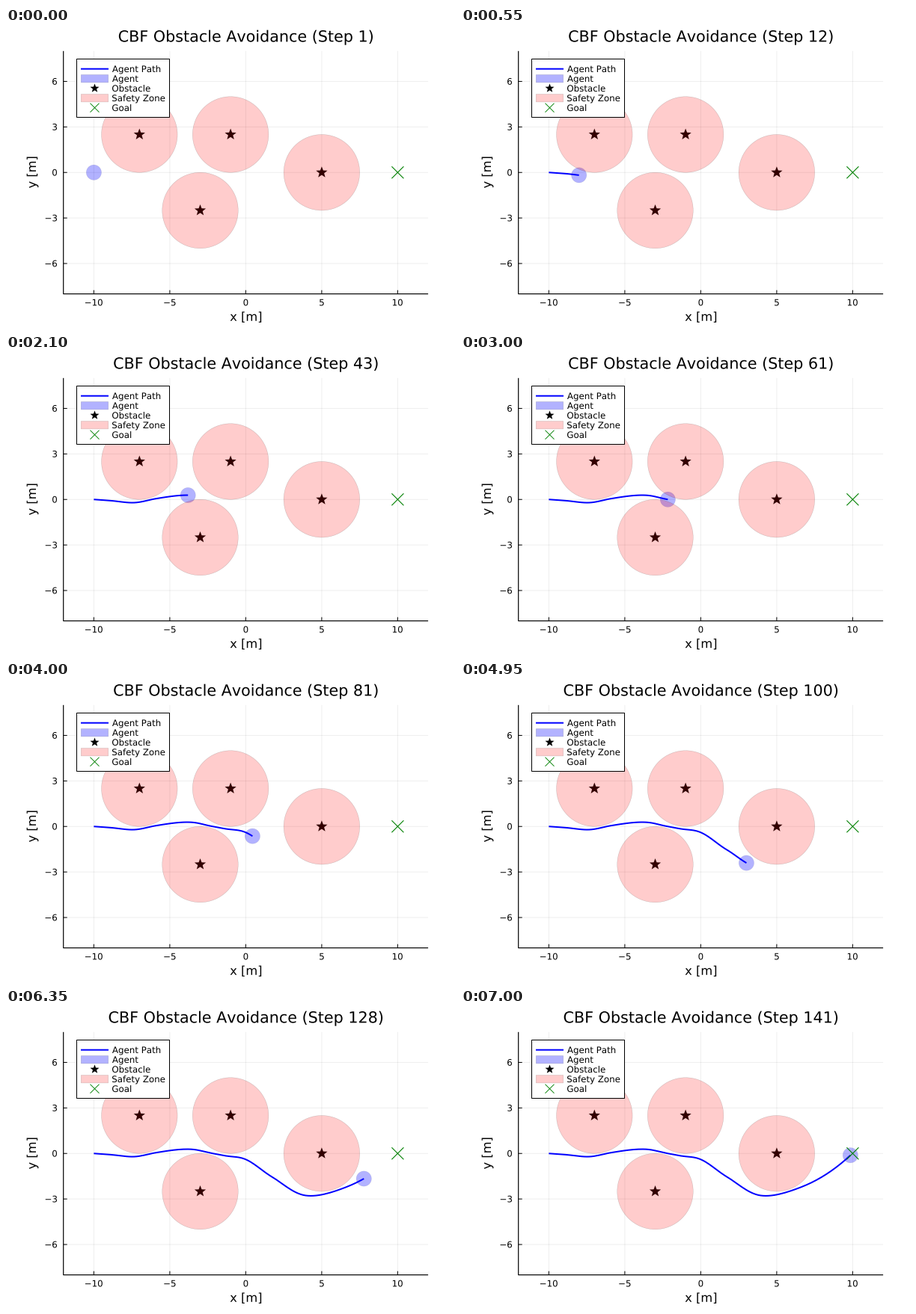
Animation, 600 px wide and 400 px high, one loop 7050 ms. Source, as a matplotlib script:

```python
import numpy as np
import matplotlib.pyplot as plt
from matplotlib.animation import FuncAnimation
from matplotlib.patches import Circle, PathPatch, Polygon, Rectangle
from matplotlib.path import Path
from matplotlib.textpath import TextPath

W, H, DPI = 600, 400, 100
PT = 72 / DPI  # points per pixel
STEPS, INTERVAL = 141, 50
LEFT, TOP, RIGHT, BOTTOM = 76.7, 30.8, 564.1, 355.7
CX, CY, UNIT = (LEFT + RIGHT) / 2, (TOP + BOTTOM) / 2, 20.3
SMALL, LABEL, TITLE = 11.83, 16.27, 20.7  # text sizes in pixels
BLUE, RED, GREEN = (0, 0, 1), (1, 0, 0), (0, 0.5, 0)
EDGE = (0, 0, 0, 0.2)

# step, x, y of the turning points on the agent's route
WAYPOINTS = [(0, -10, 0), (6, -8.9, -0.08), (15, -7.34, -0.21),
             (24, -5.93, 0.05), (43, -3.7, 0.28), (60, -2.17, 0),
             (67, -1.3, -0.16), (75, -0.2, -0.32), (90, 1.72, -1.54),
             (105, 3.94, -2.77), (120, 6.6, -2.22), (140, 9.85, -0.12)]
OBSTACLES = [(-7, 2.5), (-3, -2.5), (-1, 2.5), (5, 0)]

plt.rcParams["font.family"] = "DejaVu Sans"
plt.rcParams["text.kerning_factor"] = 6  # practically no kerning


def px(x):
    return CX + UNIT * x


def py(y):
    return CY - UNIT * y


def route(t):
    """Cubic Hermite curve through the waypoints."""
    data = np.array(WAYPOINTS, float)
    k, p = data[:, 0], data[:, 1:]
    m = np.gradient(p, k, axis=0, edge_order=2)
    i = np.clip(np.searchsorted(k, t, side="right") - 1, 0, len(k) - 2)
    h = (k[i + 1] - k[i])[:, None]
    s = (t - k[i])[:, None] / h
    return ((1 + 2 * s) * (1 - s) ** 2 * p[i] + s * (1 - s) ** 2 * h * m[i]
            + s * s * (3 - 2 * s) * p[i + 1] + s * s * (s - 1) * h * m[i + 1])


def text_path(x, y, text, size=SMALL, align=0.5, upright=False):
    """Text outline; align 0, 0.5, 1 sets left, centre, right."""
    glyphs = TextPath((0, 0), text, size=size)
    box = glyphs.get_extents()
    u, v = glyphs.vertices.T
    u = u - box.x0 - align * box.width
    verts = (x - v, y - u) if upright else (x + u, y - v)
    return Path(np.column_stack(verts), glyphs.codes)


fig = plt.figure(figsize=(W / DPI, H / DPI), dpi=DPI, facecolor="white")
ax = fig.add_axes([0, 0, 1, 1])
ax.set(xlim=(0, W), ylim=(H, 0))
ax.axis("off")


def label(*args, **kw):
    return ax.add_patch(PathPatch(text_path(*args, **kw), fc="black",
                                  lw=0, zorder=10))


def stroke(x, y, color="black", width=1.0, z=1, **kw):
    return ax.plot(x, y, color=color, lw=width * PT, zorder=z, snap=False,
                   solid_capstyle="butt", **kw)[0]


def shape(patch, face, alpha=1, edge=EDGE, width=0.5, z=1):
    patch.set(facecolor=(*face, alpha), edgecolor=edge, linewidth=width * PT,
              zorder=z, snap=False)
    return ax.add_patch(patch)


def star(x, y, r, z):
    a = np.arange(10) * np.pi / 5
    rad = np.where(np.arange(10) % 2, 0.42 * r, r)
    pts = np.column_stack([x + rad * np.sin(a), y - rad * np.cos(a)])
    shape(Polygon(pts), (0, 0, 0), width=0, z=z)


def cross(x, y, r, width, z):
    for d in (-r, r):
        stroke([x - r, x + r], [y - d, y + d], GREEN, width, z)


# axes, grid, ticks and their labels
for v in range(-10, 11, 5):
    stroke([px(v)] * 2, [TOP, BOTTOM], (0, 0, 0, 0.065))
    stroke([px(v)] * 2, [BOTTOM - 5, BOTTOM])
    label(px(v), 371.4, str(v).replace("-", "\u2212"))
for v in range(-6, 7, 3):
    stroke([LEFT, RIGHT], [py(v)] * 2, (0, 0, 0, 0.065))
    stroke([LEFT, LEFT + 5], [py(v)] * 2)
    label(68, py(v) + 4.3, str(v).replace("-", "\u2212"), align=1)
stroke([LEFT, LEFT, RIGHT], [TOP, BOTTOM, BOTTOM], width=1.2)
label(CX, 391.8, "x [m]", LABEL)
label(40, CY, "y [m]", LABEL, upright=True)
title = label(CX, 18.4, "CBF", TITLE)

# scene
xy = route(np.arange(STEPS))
xs, ys = px(xy[:, 0]), py(xy[:, 1])
path = stroke([], [], BLUE, 2, 3, solid_joinstyle="round")
agent = shape(Circle((xs[0], ys[0]), UNIT / 2), BLUE, 0.3, (0, 0, 0, 0.1), z=4)
for ox, oy in OBSTACLES:
    star(px(ox), py(oy), 8, 5)
    shape(Circle((px(ox), py(oy)), 2.5 * UNIT), RED, 0.2, z=6)
cross(px(10), py(0), 8, 1.1, 7)

# legend
shape(Rectangle((94.5, 41.5), 124, 78), (1, 1, 1), edge="black", width=1, z=8)
names = ["Agent Path", "Agent", "Obstacle", "Safety Zone", "Goal"]
rows = [54.7 + 13 * i for i in range(len(names))]
for y, name in zip(rows, names):
    label(142, y + 4.3, name, align=0)
stroke([100, 137], [rows[0]] * 2, BLUE, 2, 9)
for y, color, alpha in [(rows[1], BLUE, 0.3), (rows[3], RED, 0.2)]:
    shape(Rectangle((100.3, y - 5.2), 36.4, 10.4), color, alpha, z=9)
star(118.5, rows[2], 6.3, 9)
cross(118.5, rows[4], 6, 0.9, 9)


def update(i):
    path.set_data(xs[:i + 1], ys[:i + 1])
    agent.center = xs[i], ys[i]
    title.set_path(text_path(CX, 18.4, f"CBF Obstacle Avoidance (Step {i + 1})",
                             TITLE))
    return path, agent, title


anim = FuncAnimation(fig, update, frames=STEPS, interval=INTERVAL,
                     init_func=lambda: update(0), repeat=True,
                     repeat_delay=0, blit=False)
plt.show()
```
